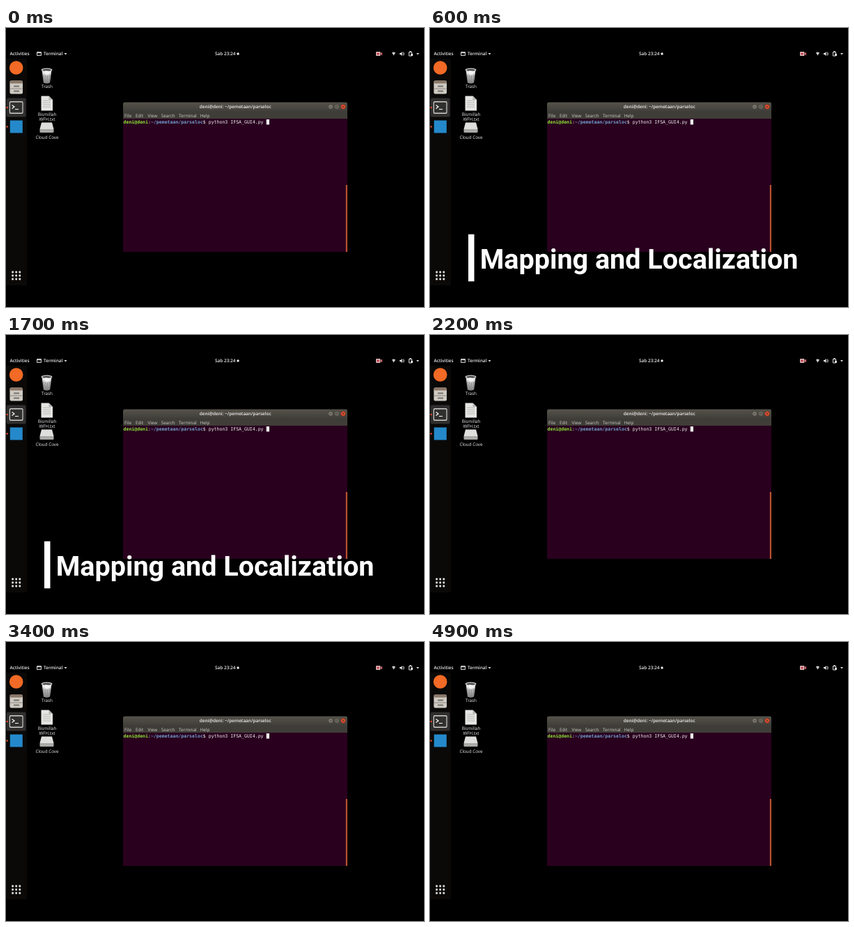
Animation of 600x400 px, one loop 5 s. Source, as an HTML page:

```html
<!DOCTYPE html>
<html>
<head>
<meta charset="utf-8">
<style>
html, body { margin: 0; width: 100%; height: 100%; overflow: hidden; background: #000; }
svg { display: block; width: 600px; height: 400px; }
text { font: 6.3px "Open Sans", "Noto Sans", sans-serif; fill: #eee; text-rendering: geometricPrecision; white-space: pre; }
.b { font-weight: 600; font-size: 6.45px; }
.m { text-anchor: middle; }
.menu text { fill: #d0cec8; }
.prompt { font: 6.56px "DejaVu Sans Mono", monospace; }
.user { fill: #8ae234; font-weight: 700; }
.path { fill: #729fcf; font-weight: 700; }
.title { font: 700 39.5px Roboto, sans-serif; fill: #fff; }
</style>
</head>
<body>
<svg viewBox="0 0 600 400">
  <defs>
    <linearGradient id="head" x2="0" y2="1">
      <stop stop-color="#56534b"/><stop offset="1" stop-color="#403e39"/>
    </linearGradient>
    <linearGradient id="metal" x2="0" y2="1">
      <stop stop-color="#eee"/><stop offset="1" stop-color="#999"/>
    </linearGradient>
    <clipPath id="reveal"><rect x="63.5" y="290" width="536.5" height="80"/></clipPath>
  </defs>

  <!-- top panel -->
  <text class="b" x="5.5" y="39">Activities</text>
  <rect x="44" y="34" width="7" height="6" rx="1" fill="#ccc"/>
  <rect x="45" y="36" width="5" height="3" fill="#222"/>
  <text class="b" x="54" y="39">Terminal</text>
  <path d="M83.5 36h4l-2 2.5z" fill="#ddd"/>
  <text class="b" x="300" y="39">Sab 23:24</text>
  <circle cx="333" cy="37" r="1.7" fill="#eee"/>
  <rect x="531" y="34" width="6.5" height="6" rx="1" fill="#d9b8b8"/>
  <circle cx="534" cy="37" r="1.8" fill="#c5404a"/>
  <path d="M537 37l3-2.5v5z" fill="#d4656d"/>
  <path d="M554 35.5q2.500-2 5 0l-2.500 4z" fill="#ccc"/>
  <path d="M565 36h1.5l2-2v6l-2-2H565z" fill="#eee"/>
  <path d="M569.5 35q1.8 2 0 4M570.6 34.3q2 2.7 0 5.4" fill="none" stroke="#ddd" stroke-width=".7"/>
  <path d="M578.5 34.5h4v5.5h-4zM579.5 33.5h2" fill="none" stroke="#ddd"/>
  <path d="M581 37h3v3h-3z" fill="#ddd"/>
  <path d="M589 36h4l-2 2.5z" fill="#ddd"/>

  <!-- dock -->
  <rect y="44" width="30" height="325" fill="#0a0908"/>
  <circle cx="14.7" cy="57" r="9.8" fill="#f26a25"/>
  <rect x="5.5" y="75.5" width="18.5" height="19" rx="2" fill="#cfcac2"/>
  <rect x="5.5" y="75.5" width="18.5" height="4" rx="1.5" fill="#8c7868"/>
  <path d="M6 87h17.5" stroke="#8b8781"/>
  <path d="M11 82.5h8v2h-8zM11 89.5h8v2h-8z" fill="#77736d"/>
  <rect x="1" y="100.5" width="27.5" height="27" rx="2" fill="#302f2e"/>
  <rect x="4.8" y="105" width="19.8" height="18" rx="2" fill="#d0cfcb"/>
  <rect x="6" y="106.5" width="17.4" height="15" rx="1" fill="#30302f"/>
  <path d="M8.5 110.5l3.5 2.5-3.5 2.5M13 116.5h5" fill="none" stroke="#fff" stroke-width="1.2"/>
  <rect x="5.8" y="132.5" width="18" height="18" fill="#2489ca"/>
  <g fill="#d9482b"><circle cx="1.7" cy="114" r="1.3"/><circle cx="1.7" cy="141.5" r="1.3"/></g>
  <g id="apps" fill="#e0e0e0"></g>

  <!-- desktop -->
  <path d="M51.500 60h14l-2.500 18.500q-4.500 2-9 0z" fill="url(#metal)"/>
  <path d="M54 67l1.500 12M57 68l.5 11M60 68l-.5 11M63 67l-1.500 12" stroke="#666" stroke-width=".8"/>
  <ellipse cx="58.500" cy="60" rx="8" ry="2.400" fill="#ccc"/>
  <ellipse cx="58.500" cy="60.300" rx="6.300" ry="1.500" fill="#444"/>
  <path d="M53 64l4-3 5 1 2 3-5 2z" fill="#f2f2f2"/>
  <text class="m" x="59" y="86">Trash</text>
  <path d="M50.500 97.500h11l5.500 5.500v15.500h-16.500z" fill="#e5e5e3"/>
  <path d="M61.500 97.500v5.500h5.500z" fill="#b5b5b3"/>
  <path d="M53 104h11M53 107h11M53 110h11M53 113h11" stroke="#aaa" stroke-width=".8"/>
  <text class="m" x="59" y="125.500">Bismillah</text>
  <path d="M51 135.500h15l2.500 9.500h-20z" fill="#dededc"/>
  <path d="M48.500 145h20v4q0 1-1 1h-18q-1 0-1-1z" fill="#a9a9a7"/>
  <text class="m" x="59" y="133">WFH.txt</text>
  <text class="m" x="59" y="158.500">Cloud Cove</text>

  <!-- terminal window -->
  <path d="M168 120v-11q0-2.500 2.500-2.500h317q2.500 0 2.500 2.500v11z" fill="url(#head)"/>
  <rect x="168" y="119.500" width="322" height="11" fill="#3f3d38"/>
  <rect x="168" y="130" width="322" height="191" fill="#29001e"/>
  <rect x="487.800" y="225" width="2.200" height="96" fill="#b9502f"/>
  <text class="b m" x="329.200" y="115.200">deni@deni: ~/pemetaan/parseloc</text>
  <g stroke="#2f2d29" stroke-width=".5">
    <circle cx="466" cy="112.800" r="3.400" fill="#7d7a71"/>
    <circle cx="475" cy="112.800" r="3.400" fill="#7d7a71"/>
    <circle cx="484" cy="112.800" r="3.600" fill="#df4d2c"/>
  </g>
  <path d="M464.500 113h3M473.700 111.500h2.600v2.600h-2.600zM482.700 111.500l2.600 2.600m0-2.600l-2.600 2.600" fill="none" stroke="#393630" stroke-width=".7"/>
  <g class="menu">
    <text x="170" y="127.500">File</text><text x="186" y="127.500">Edit</text>
    <text x="203.500" y="127.500">View</text><text x="222.800" y="127.500">Search</text>
    <text x="248" y="127.500">Terminal</text><text x="278.700" y="127.500">Help</text>
  </g>
  <text class="prompt" x="168.500" y="137"><tspan class="user">deni@deni</tspan>:<tspan class="path">~/pemetaan/parseloc</tspan>$ python3 IFSA_GUI4.py</text>
  <rect x="373.700" y="131" width="4.300" height="7.500" fill="#eee"/>

  <!-- caption -->
  <rect id="bar" x="55" width="8.500" fill="#fff"/>
  <g clip-path="url(#reveal)"><text id="title" class="title" y="345">Mapping and Localization</text></g>
</svg>
<script>
const $ = id => document.getElementById(id);
const clamp = v => Math.max(0, Math.min(1, v));
const ease = v => 1 - (1 - clamp(v)) ** 3;

for (const y of [350, 355, 360])
  for (const x of [9.6, 14.7, 19.8])
    $('apps').innerHTML += `<rect x="${x - 1.4}" y="${y - 1.4}" width="2.8" height="2.8" rx=".8"/>`;

function draw(now) {
  const t = Math.floor(now % 5000 / 100) * 100;
  // caption progress: in by 600 ms, out from 1800 to 2200 ms
  const p = t < 1800 ? t / 600 : (2200 - t) / 400;
  const h = 67.5 * ease(p / 0.5);
  $('bar').setAttribute('y', 329.5 - h / 2);
  $('bar').setAttribute('height', h);
  $('title').setAttribute('x', 71.7 - 470 * (1 - ease((p - 0.3) / 0.7)));
}

const start = performance.now();
function tick() {
  draw(performance.now() - start);
  requestAnimationFrame(tick);
}
tick();
</script>
</body>
</html>
```
